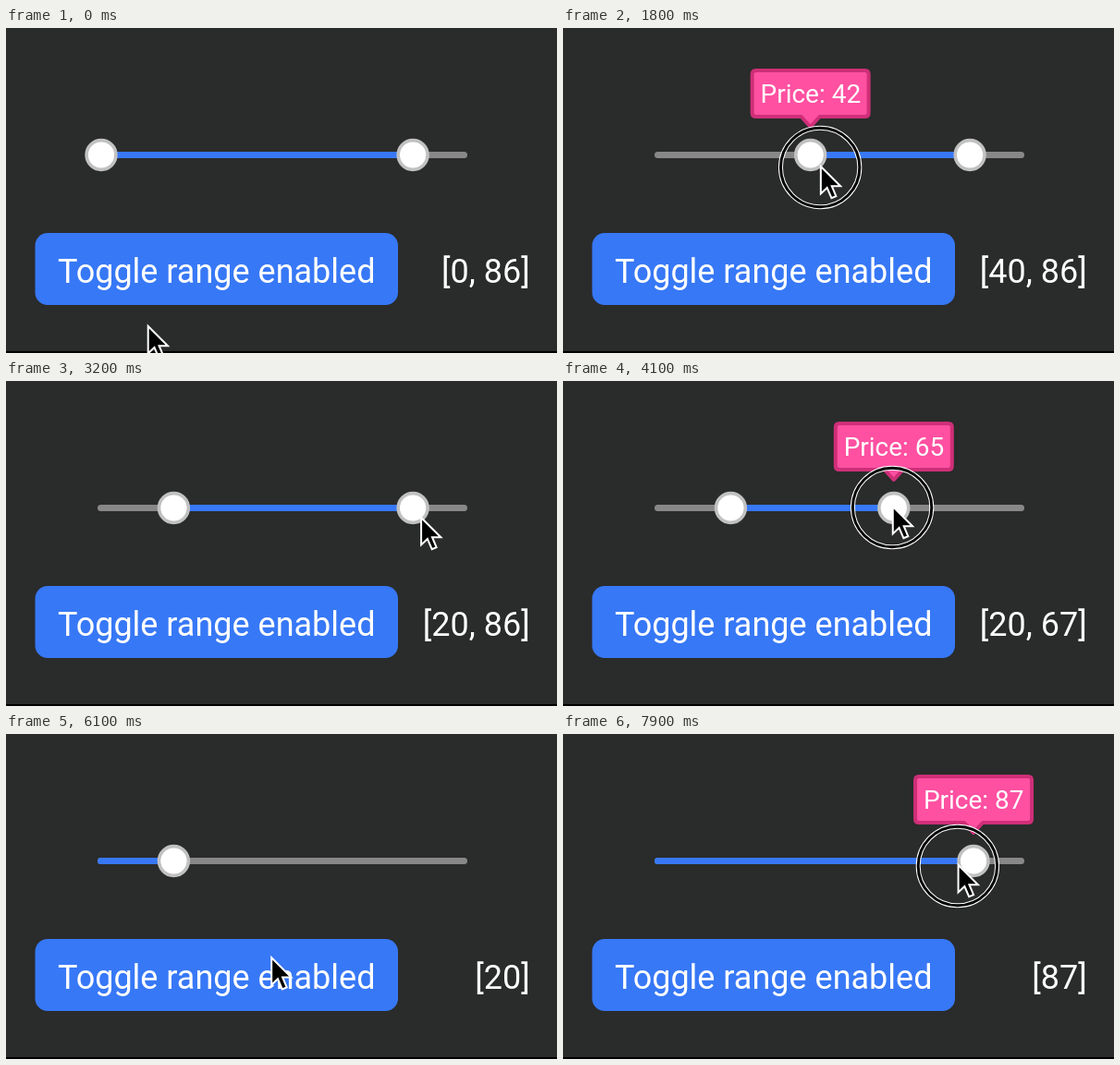
Animation, 596 px wide and 352 px high, one loop 8 s. Source, as an HTML page:

```html
<!DOCTYPE html>
<html lang="en">
<head>
<meta charset="utf-8">
<title>Range slider</title>
<style>
  html, body { margin: 0; width: 100%; height: 100%; overflow: hidden; background: #2a2b2b; }
  svg { display: block; width: 596px; height: 352px; }
  text { font-family: Roboto, sans-serif; font-size: 36px; fill: #fff; }
  .thumb { fill: #fff; stroke: #c1c1c1; stroke-width: 3.6; }
  .line { stroke-width: 7; stroke-linecap: round; }
  #tip path { fill: #ff50a1; stroke: #cf2f78; stroke-width: 4; stroke-linejoin: round; }
  #tip text { font-size: 28px; text-anchor: middle; }
</style>
</head>
<body>
<svg viewBox="0 0 596 352">
  <rect width="596" height="352" fill="#2a2b2b"/>
  <rect y="350" width="596" height="2" fill="#000"/>
  <rect x="31.5" y="222" width="392.5" height="78" rx="13.5" fill="#3778f6"/>
  <text x="227.7" y="276" text-anchor="middle">Toggle range enabled</text>
  <text id="label" x="566.7" y="276" text-anchor="end"></text>
  <path class="line" d="M102.5 137.5H495.5" stroke="#888"/>
  <path class="line" id="fill" stroke="#3778f6"/>
  <circle class="thumb" id="low" cy="137.5" r="15.9"/>
  <circle class="thumb" id="high" cy="137.5" r="15.9"/>
  <g id="tip"><path/><text y="81"></text></g>
  <g id="pointer">
    <g id="ring" fill="none">
      <circle cx="-.7" cy="1" r="42.7" stroke="#fff" stroke-width="5"/>
      <circle cx="-.7" cy="1" r="42.7" stroke="#000" stroke-width="3"/>
    </g>
    <path d="M0 0V29.5L6.8 23L11.6 34.2L16.5 32.1L11.9 21.2H21.3Z" fill="#000" stroke="#fff" stroke-width="2"/>
  </g>
</svg>
<script>
const LOOP = 8000, STEP = 100, TOGGLE = 5900, LEAD = 130;
const UNIT = 3.92, LEFT = 85, RIGHT = 513;

// Eased moves: [from ms, to ms, change, change in y]
const lowMoves = [[800, 1900, 43], [1900, 2500, -23], [6500, 6700, -3], [6780, 7760, 70], [7900, 8200, -10]];
const highMoves = [[3400, 3500, 1], [3600, 4100, -22], [4300, 4900, 29]];
const trips = [
  [0, 400, -40, -173], [2600, 3200, 257, -2], [3200, 3400, -10, -12],
  [5200, 5700, -172, 117.5], [6000, 6500, -118, -117.5], [7000, 7900, 0, 6]
];

const $ = id => document.getElementById(id);
const clamp = (v, min, max) => Math.min(max, Math.max(min, v));
const ease = p => (1 - Math.cos(Math.PI * clamp(p, 0, 1))) / 2;
const sum = (moves, t, col = 2) =>
  moves.reduce((total, m) => total + m[col] * ease((t - m[0]) / (m[1] - m[0])), 0);
const within = (t, from, to) => t >= from && t < to;
const show = (id, on) => { $(id).style.display = on ? '' : 'none'; };

const lowAt = t => Math.round(sum(lowMoves, t));
const highAt = t => Math.round(86 + sum(highMoves, t));
const toX = v => 103 + UNIT * v;

// The box stays inside the slider while its arrow follows the thumb.
function drawTip(v) {
  const [shape, text] = $('tip').children;
  const x = toX(v), half = v < 10 ? 55 : 63;
  const mid = clamp(x, LEFT + half + 2, RIGHT - half - 2);
  const l = mid - half, r = mid + half;
  shape.setAttribute('d',
    `M${l + 4} 46H${r - 4}q4 0 4 4V92q0 4 -4 4H${x + 10}L${x} 107L${x - 10} 96H${l + 4}q-4 0 -4 -4V50q0 -4 4 -4Z`);
  text.setAttribute('x', mid + 0.2);
  text.textContent = `Price: ${v}`;
}

function draw(t) {
  const range = t < TOGGLE;
  const low = toX(lowAt(t)), high = toX(highAt(t));
  $('low').setAttribute('cx', low);
  $('high').setAttribute('cx', high);
  $('fill').setAttribute('d', range ? `M${low} 137.5H${high}` : `M102.5 137.5H${low}`);
  show('high', range);

  // The readout updates one step after the thumb.
  const before = t - STEP;
  $('label').textContent = range ? `[${lowAt(before)}, ${highAt(before)}]` : `[${lowAt(before)}]`;

  // The pointer travels with the dragged thumb, running ahead of it in single mode.
  const dragged = sum(lowMoves, range ? t : t + LEAD) + sum(highMoves, t);
  const x = 153.7 + sum(trips, t) + UNIT * dragged;
  const y = 323 + sum(trips, t, 3);
  $('pointer').setAttribute('transform', `translate(${x} ${y})`);

  const lowDrag = within(t, 800, 2600) || t >= 6500;
  const highDrag = within(t, 3400, 5000);
  const click = within(t, 5800, 6000);
  show('ring', lowDrag || highDrag || click);

  const lowTip = lowDrag && t !== 800 && t !== 6500;
  const highTip = within(t, 3500, 5100);
  show('tip', lowTip || highTip);
  if (lowTip || highTip) drawTip(lowTip ? lowAt(t) : highAt(t));
}

function tick() {
  draw(Math.floor(performance.now() % LOOP / STEP) * STEP);
  requestAnimationFrame(tick);
}
tick();
</script>
</body>
</html>
```
